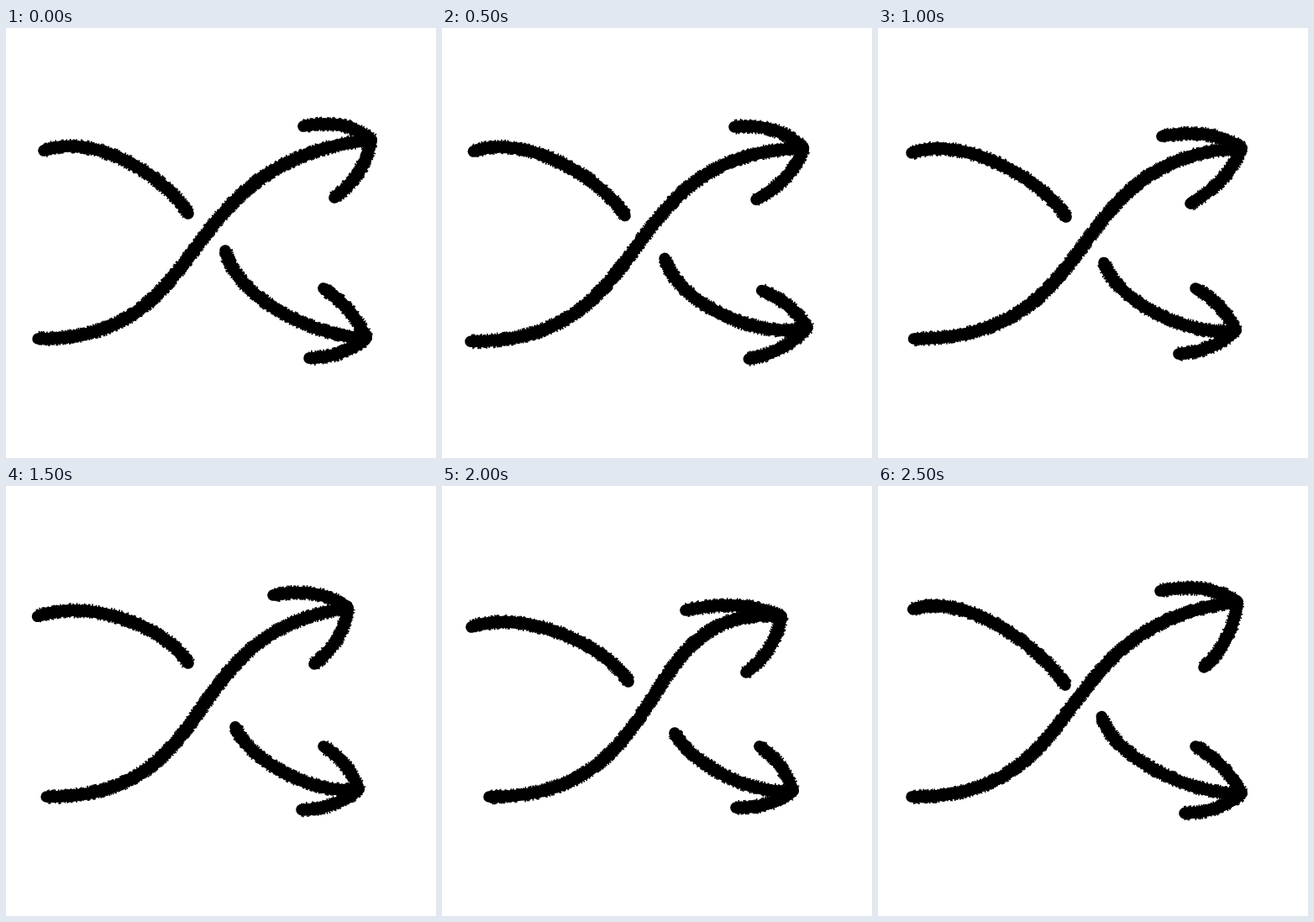
These frames come from a looping animation (512 px wide and 512 px high, 2830 ms). An HTML page with a canvas:

```html
<!DOCTYPE html>
<html lang="en">
<head>
<meta charset="utf-8">
<title>Crossing arrows</title>
<style>
  html, body { margin: 0; width: 100%; height: 100%; overflow: hidden; background: #fff; }
  canvas { display: block; width: 512px; height: 512px; }
</style>
</head>
<body>
<canvas id="stage" width="512" height="512"></canvas>
<script>
const ctx = document.getElementById('stage').getContext('2d');
const HOLD = 250, LOOP = 2830, COUNT = 11, INSET = 8;

// Joints that jump freely, by drawing:
// tail end, shaft pull, upper tip, its two barb ends, lower tip.
const joints = {
  0: '217,221 192,160 435,133 354,117 391,202 429,369',
  1: '221,221 203,152 421,140 334,128 360,207 424,350',
  3: '217,223 200,145 432,145 358,107 383,199 438,357',
  4: '224,225 215,153 433,143 338,129 372,209 426,360',
  6: '217,211 200,175 407,145 318,130 367,212 420,361',
  8: '222,233 223,140 404,155 290,148 362,222 418,363',
  10: '223,237 198,165 428,138 336,125 388,216 433,366'
};

// Inked bounds of the drawings that lie halfway between their neighbours.
const bounds = {
  2: [26, 109, 443, 402], 5: [30, 119, 435, 398],
  7: [24, 118, 430, 390], 9: [32, 120, 441, 399]
};

const mix = (a, b, t) => a.map((v, k) => v + (b[k] - v) * t);
const add = (p, x, y) => [p[0] + x, p[1] + y];
const parse = text => text.split(' ').map(pair => pair.split(',').map(Number));

function seeded(seed) {
  return () => {
    seed = (seed * 1664525 + 1013904223) >>> 0;
    return seed / 4294967296;
  };
}

// Bezier curve of any degree, sampled about every 1.5 px.
function curve(...controls) {
  let length = 0;
  for (let i = 1; i < controls.length; i++) {
    length += Math.hypot(controls[i][0] - controls[i - 1][0], controls[i][1] - controls[i - 1][1]);
  }
  const steps = Math.ceil(length / 1.5);
  return Array.from({ length: steps + 1 }, (_, s) => {
    let points = controls;
    while (points.length > 1) points = points.slice(1).map((p, i) => mix(points[i], p, s / steps));
    return points[0];
  });
}

// Arc whose middle control is pushed away from the chord.
const bowed = (a, b, x, y) => curve(a, add(mix(a, b, 0.5), x, y), b);

function strokes(index, [tailEnd, pull, upperTip, topBarb, underBarb, lowerTip]) {
  // The left ends and the lower shaft slide along slowly, then swing back.
  const drift = index <= 8 ? index / 8 : (COUNT - index) / 3;
  const tail = [45 - 10 * drift, 146 + 22 * drift ** 3];
  const start = [38 + 18 * drift ** 2, 370];
  const lower = [261 + 16 * drift, 265 + 29 * drift];
  return [
    curve(tail, add(tail, 60, -22), add(tailEnd, -28, -45), tailEnd),
    curve(start, [pull[0] + 60, 371], pull, upperTip),
    curve(lower, [lower[0] + 16, 326], [lowerTip[0] - 55, 369], lowerTip),
    bowed(topBarb, upperTip, 10, -18),
    bowed(upperTip, underBarb, 14, 8),
    bowed([378, 310], lowerTip, 8, -8),
    bowed(lowerTip, [lowerTip[0] - 68, 393 - 10 * drift], 8, 11)
  ];
}

function fit(lines, box) {
  const maps = [0, 1].map(k => {
    const values = lines.flat().map(p => p[k]);
    const min = Math.min(...values), max = Math.max(...values);
    const low = box[k] + INSET, high = box[k + 2] - INSET;
    return v => low + (v - min) / (max - min) * (high - low);
  });
  return lines.map(line => line.map(p => p.map((v, k) => maps[k](v))));
}

function pose(index) {
  if (joints[index]) return strokes(index, parse(joints[index]));
  const before = parse(joints[index - 1]), after = parse(joints[index + 1]);
  return fit(strokes(index, before.map((p, i) => mix(p, after[i], 0.5))), bounds[index]);
}

function line(points, width, cap) {
  ctx.lineWidth = width;
  ctx.lineCap = cap;
  ctx.beginPath();
  points.forEach(p => ctx.lineTo(...p));
  ctx.stroke();
}

// Solid stroke with a bristly edge.
function brush(path, random) {
  line(path, 13.6, 'round');
  for (let i = 1; i < path.length; i++) {
    const [x, y] = path[i], dx = x - path[i - 1][0], dy = y - path[i - 1][1];
    const length = Math.hypot(dx, dy) || 1;
    const bristle = side => {
      const reach = side * (6.4 + 2.8 * random()) / length;
      return [x - dy * reach, y + dx * reach];
    };
    line([bristle(-1), bristle(1)], 1.6, 'butt');
  }
}

function draw(index) {
  const random = seeded(index * 7919 + 17);
  ctx.clearRect(0, 0, 512, 512);
  ctx.lineJoin = 'round';
  pose(index).forEach(path => brush(path, random));
}

let shown = -1;
function tick() {
  const index = Math.min(COUNT - 1, Math.floor(performance.now() % LOOP / HOLD));
  if (index !== shown) draw(shown = index);
  requestAnimationFrame(tick);
}
tick();
</script>
</body>
</html>
```
